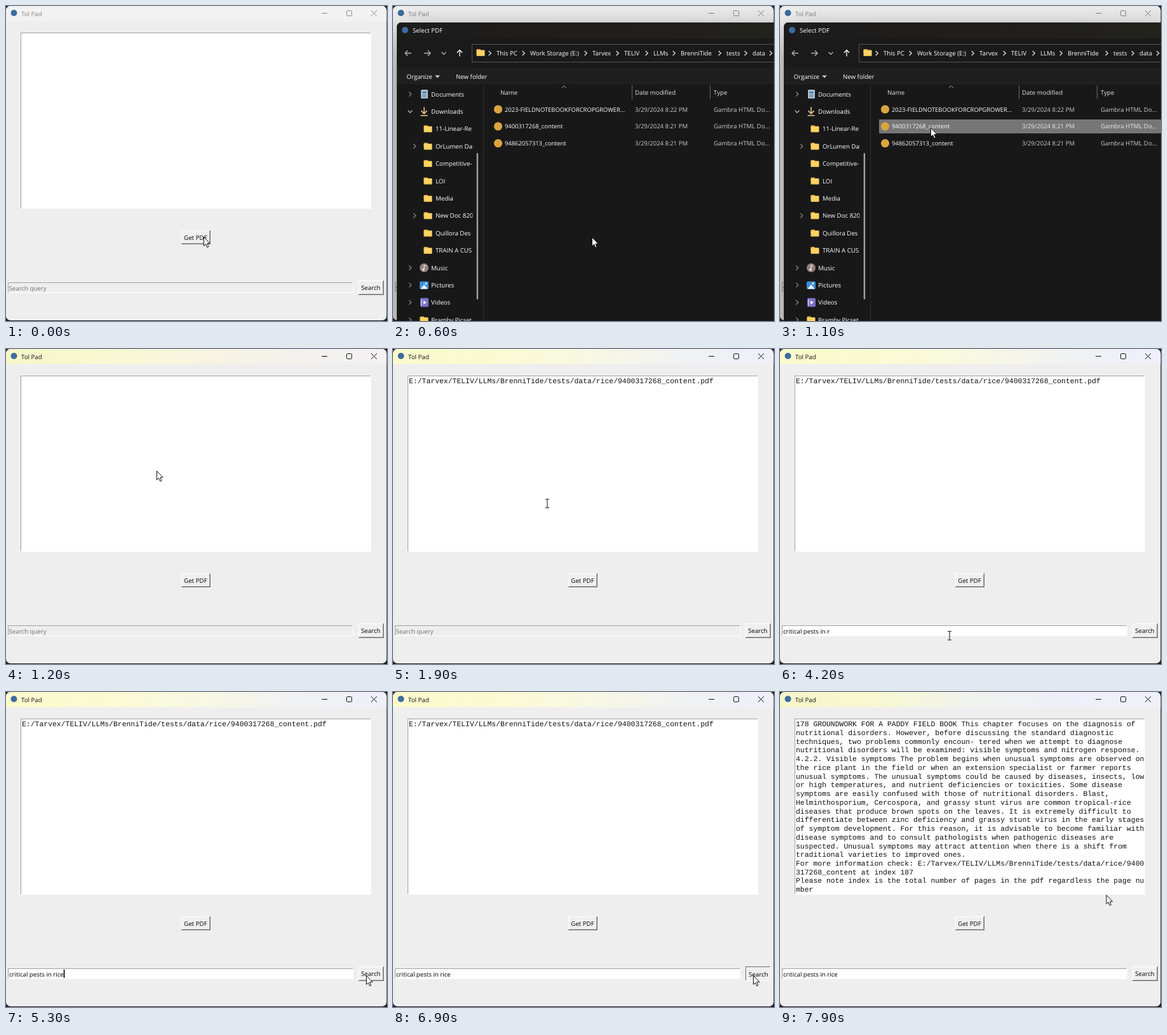
Animation of 600 by 497 pixels, one loop 8 s. Source, as an HTML page with a canvas:

```html
<!DOCTYPE html>
<html lang="en">
<head>
<meta charset="utf-8">
<title>Tol Pad</title>
<style>
html, body { margin: 0; width: 100%; height: 100%; overflow: hidden; background: #1c2023; }
canvas { display: block; }
</style>
</head>
<body>
<canvas id="stage" width="600" height="497"></canvas>
<script>
const c = document.getElementById('stage').getContext('2d');
const LOOP = 8000, STEP = 100;
const UI = '"Open Sans", "Noto Sans", sans-serif';
const MONO = '"Liberation Mono", "Courier New", monospace';
const QUERY = 'critical pests in rice';
const PATH = 'E:/Tarvex/TELIV/LLMs/BrenniTide/tests/data/rice/9400317268_content.pdf';
const RESULT = [
  '178 GROUNDWORK FOR A PADDY FIELD BOOK This chapter focuses on the diagnosis of',
  'nutritional disorders. However, before discussing the standard diagnostic',
  'techniques, two problems commonly encoun- tered when we attempt to diagnose',
  'nutritional disorders will be examined: visible symptoms and nitrogen response.',
  '4.2.2. Visible symptoms The problem begins when unusual symptoms are observed on',
  'the rice plant in the field or when an extension specialist or farmer reports',
  'unusual symptoms. The unusual symptoms could be caused by diseases, insects, low',
  'or high temperatures, and nutrient deficiencies or toxicities. Some disease',
  'symptoms are easily confused with those of nutritional disorders. Blast,',
  'Helminthosporium, Cercospora, and grassy stunt virus are common tropical-rice',
  'diseases that produce brown spots on the leaves. It is extremely difficult to',
  'differentiate between zinc deficiency and grassy stunt virus in the early stages',
  'of symptom development. For this reason, it is advisable to become familiar with',
  'disease symptoms and to consult pathologists when pathogenic diseases are',
  'suspected. Unusual symptoms may attract attention when there is a shift from',
  'traditional varieties to improved ones.',
  'For more information check: E:/Tarvex/TELIV/LLMs/BrenniTide/tests/data/rice/9400',
  '317268_content at index 187',
  'Please note index is the total number of pages in the pdf regardless the page nu',
  'mber'
];

// Event times in ms
const OPEN = 300, PICK = 1000, CLOSE = 1200, LOADED = 1500, FOCUS = 2500;
const PRESS = 5600, FREEZE = 5800, DONE = 7500;

// [time, x, y] and [time, characters]
const MOUSE = [[0, 311, 364], [300, 313, 364.5], [600, 313, 364.5], [1000, 237, 192], [1700, 237, 192],
  [2400, 267, 452], [4700, 267, 452], [5200, 567, 447], [7400, 567, 447], [7800, 513.5, 320]];
const KEYS = [[2500, 0], [2700, 2], [3000, 9], [3600, 16], [4500, 21], [4600, 22]];

function track(keys, t, ease = p => p) {
  const last = keys[keys.length - 1];
  if (t <= keys[0][0]) return keys[0].slice(1);
  if (t >= last[0]) return last.slice(1);
  const i = keys.findIndex(k => k[0] > t);
  const a = keys[i - 1], b = keys[i];
  const p = ease((t - a[0]) / (b[0] - a[0]));
  return a.slice(1).map((v, n) => v + (b[n + 1] - v) * p);
}
const smooth = p => p * p * (3 - 2 * p);

function rect(x, y, w, h, fill) {
  c.fillStyle = fill;
  c.fillRect(x, y, w, h);
}
function round(x, y, w, h, r, fill) {
  c.beginPath();
  c.roundRect(x, y, w, h, r);
  c.fillStyle = fill;
  c.fill();
}
function disc(x, y, r, fill) {
  c.beginPath();
  c.arc(x, y, r, 0, Math.PI * 2);
  c.fillStyle = fill;
  c.fill();
}
function line(color, width, ...pts) {
  c.beginPath();
  for (let i = 0; i < pts.length; i += 2) c.lineTo(pts[i], pts[i + 1]);
  c.strokeStyle = color;
  c.lineWidth = width;
  c.stroke();
}
function shape(fill, ...pts) {
  c.beginPath();
  for (let i = 0; i < pts.length; i += 2) c.lineTo(pts[i], pts[i + 1]);
  c.closePath();
  c.fillStyle = fill;
  c.fill();
}
// y is the middle of the capitals
function text(s, x, y, color, size = 9.7, align = 'left') {
  c.font = size + 'px ' + UI;
  c.textAlign = align;
  c.fillStyle = color;
  c.fillText(s, x, y + 3.5);
}
function fade(x0, x1, ...colors) {
  const g = c.createLinearGradient(x0, 0, x1, 0);
  colors.forEach((v, i) => g.addColorStop(i / (colors.length - 1), v));
  return g;
}

function button(label, x, y, w, h, down) {
  const light = '#ffffff', dark = '#6c6c6c';
  rect(x, y, w, h, down ? light : dark);
  rect(x, y, w - 1, h - 1, down ? dark : light);
  rect(x + 1, y + 1, w - 2, h - 2, down ? '#efeeef' : '#a9a9a9');
  rect(x + 1, y + 1, w - 3, h - 3, '#f0eff0');
  const d = down ? 1 : 0;
  text(label, x + w / 2 - 0.5 + d, y + h / 2 + d, '#000', 9.7, 'center');
}

function sunken(x, y, w, h, fill) {
  rect(x, y, w, h, '#fdfdfd');
  rect(x, y, w - 1, h - 1, '#a0a0a0');
  rect(x + 1, y + 1, w - 2, h - 2, fill);
}

function titleFill(t) {
  if (t < CLOSE) return '#f3f2f3';
  if (t < LOADED) return fade(0, 600, '#f6f6c8', '#f9f8d2', '#f7f5df', '#f4f1ed', '#f3f1f3');
  if (t < DONE) return fade(0, 600, '#fbfacb', '#fafad2', '#f8f8e2', '#f1f2f3', '#eeeff9');
  return fade(0, 600, '#f5f7c9', '#f7f8d0', '#f1f3ee', '#eeeff8', '#eff0f8');
}

function appWindow(t) {
  rect(0, 0, 600, 497, '#1c2023');
  c.save();
  c.beginPath();
  c.roundRect(0, 0, 599.3, 496, 7);
  c.clip();
  rect(0, 0, 600, 497, '#efeeef');
  rect(0, 0, 600, 24, titleFill(t));
  const ink = t < CLOSE ? '#858585' : '#111';
  disc(12.5, 11, 5, '#3d6d9e');
  text('Tol Pad', 24, 12, ink);
  line(ink, 1, 497, 11.5, 506, 11.5);
  c.beginPath();
  c.roundRect(536.5, 7.5, 8, 8, 1);
  c.stroke();
  line(ink, 1, 575, 7, 584, 16);
  line(ink, 1, 584, 7, 575, 16);

  sunken(23, 42, 552, 278, '#fff');
  const lines = t >= DONE ? RESULT : t >= LOADED ? [PATH] : [];
  c.font = '11.43px ' + MONO;
  c.textAlign = 'left';
  c.fillStyle = '#111';
  lines.forEach((s, i) => c.fillText(s, 25, 54.3 + i * 13.73));

  button('Get PDF', 276, 354, 46, 22, false);
  button('Search', 555, 433, 40, 23, t >= PRESS && t < DONE);
  entry(t);
  c.restore();
}

function entry(t) {
  const active = t >= FOCUS;
  sunken(3, 436, 544, 17, active ? '#fff' : '#efeeef');
  if (!active) return text('Search query', 4.5, 445, '#707070');
  const typed = QUERY.slice(0, Math.floor(track(KEYS, t)[0] + 0.01));
  text(typed, 5, 445, '#000');
  const lit = t < FREEZE && (t - FOCUS) % 900 < 600;
  if (lit) rect(5 + c.measureText(typed).width, 438, 1.6, 13, '#000');
}

function folder(x, y) {
  round(x - 6.5, y - 5.5, 6.5, 6, 1, '#dfa437');
  round(x - 6.5, y - 4, 13, 9.5, 1.2, '#f9d365');
  rect(x - 5.5, y + 4.2, 11, 0.8, '#e5b03f');
}

const icons = {
  Documents(x, y) {
    round(x - 5, y - 7, 11, 14, 1.5, '#a9bfd0');
    rect(x - 2.5, y - 4, 6, 3, '#4f7fa5');
    rect(x - 2.5, y + 1, 6, 1, '#55707f');
    rect(x - 2.5, y + 3.5, 6, 1, '#55707f');
  },
  Downloads(x, y) {
    line('#e9cf8b', 1.6, x, y - 7, x, y + 3);
    line('#e9cf8b', 1.6, x - 4.5, y - 1, x, y + 3.5, x + 4.5, y - 1);
    line('#e9cf8b', 1.6, x - 5.5, y + 6.3, x + 5.5, y + 6.3);
  },
  Music(x, y) {
    disc(x, y, 7, '#94817b');
    line('#eee', 1.2, x, y + 3, x, y - 4, x + 3, y - 3);
    disc(x - 1.2, y + 3, 1.8, '#eee');
  },
  Pictures(x, y) {
    round(x - 7, y - 6, 14, 12, 2, '#3c8fd6');
    shape('#e6f2fb', x - 6, y + 6, x, y - 1, x + 6, y + 6);
    disc(x + 3, y - 2.5, 1.4, '#fff');
  },
  Videos(x, y) {
    round(x - 6, y - 7, 13, 14, 2, '#7871c8');
    rect(x - 5, y - 5, 1.5, 10, '#c9c5f2');
    shape('#fff', x - 1, y - 3, x + 4, y, x - 1, y + 3);
  }
};

// "-" marks a child, "+" a child that can unfold
const TREE = ['Documents', 'Downloads', '-11-Linear-Re', '+OrLumen Das', '-Competitive-', '-LOI', '-Media',
  '+New Doc 820', '-Quillora Des', '-TRAIN A CUS', 'Music', 'Pictures', 'Videos', 'Bramby Picset'];
const CRUMBS = [['This PC', 163], ['Work Storage (E:)', 216], ['Tarvex', 314], ['TELIV', 364], ['LLMs', 410],
  ['BrenniTide', 453], ['tests', 525], ['data', 566]];
const FILES = [['2023-FIELDNOTEBOOKFORCROPGROWER...', '8:22'], ['9400317268_content', '8:21'], ['94862057313_content', '8:21']];

const chevron = (x, y, color) => line(color, 1.2, x - 1.8, y - 3.5, x + 1.8, y, x - 1.8, y + 3.5);
const caretDown = (x, y, color) => line(color, 1.3, x - 3.5, y - 1.8, x, y + 1.8, x + 3.5, y - 1.8);

function arrowIcon(x, y, turn, color) {
  c.save();
  c.translate(x, y);
  c.rotate(turn);
  line(color, 1.3, -5, 0, 5, 0);
  line(color, 1.3, 0.8, -4.2, 5, 0, 0.8, 4.2);
  c.restore();
}

function sidebar() {
  c.save();
  c.beginPath();
  c.rect(0, 120, 125.5, 377);
  c.clip();
  TREE.forEach((item, i) => {
    const y = 139 + i * 27.4, child = '+-'.includes(item[0]);
    const name = child ? item.slice(1) : item;
    if (item === 'Downloads') caretDown(27, y, '#bbb');
    else if (item[0] !== '-') chevron(child ? 34 : 27, y, '#8a8a8a');
    (icons[name] || folder)(child ? 55 : 49, y);
    text(name, child ? 67 : 60, y, '#fff');
  });
  c.restore();
  round(131.7, 232, 2.4, 231, 1.2, '#a3a2a3');
  rect(142, 125, 1, 372, '#302f30');
}

function fileList(t) {
  text('Name', 169, 136, '#e2e2e2');
  text('Date modified', 381, 136, '#e2e2e2');
  text('Type', 505, 136, '#e2e2e2');
  line('#aaa', 1, 266, 129, 269.5, 126, 273, 129);
  rect(376, 125, 1, 22, '#6a696a');
  rect(499, 125, 1, 22, '#6a696a');
  FILES.forEach(([name, time], i) => {
    const y = 163 + i * 26.8, on = i === 1 && t >= PICK;
    if (on) rect(156, 179, 444, 22, '#777677');
    const soft = on ? '#ececec' : '#cccbcc';
    disc(165.5, y, 6.6, '#d9a53f');
    text(name, 176, y, '#fff', 9.4);
    text('3/29/2024 ' + time + ' PM', 381, y, soft, 9.5);
    text('Gambra HTML Do...', 505, y, soft);
  });
}

function dialog(t) {
  c.save();
  c.shadowColor = 'rgba(0,0,0,0.5)';
  c.shadowBlur = 60;
  c.shadowOffsetY = 20;
  round(6, 26, 640, 520, [7, 0, 0, 0], '#191819');
  c.restore();

  c.save();
  c.beginPath();
  c.roundRect(6, 26, 640, 520, [7, 0, 0, 0]);
  c.clip();
  rect(6, 26, 600, 25, fade(6, 600, '#1d1c1d', '#1f1e1c', '#22221c'));
  rect(6, 51, 600, 47, '#1b1a1b');
  rect(6, 98, 600, 26, '#201f20');

  disc(19, 38, 5, '#3d6d9e');
  text('Select PDF', 31, 38.5, '#fff');
  arrowIcon(24, 74.5, Math.PI, '#b5b5b5');
  arrowIcon(54, 74.5, 0, '#b5b5b5');
  caretDown(80, 74.5, '#b5b5b5');
  arrowIcon(105, 74.5, -Math.PI / 2, '#fff');

  c.strokeStyle = '#555455';
  c.lineWidth = 1;
  c.strokeRect(124.5, 60.5, 490, 28);
  folder(138, 73.5);
  CRUMBS.forEach(([s, x]) => {
    chevron(x - 10.5, 74.5, '#eee');
    text(s, x, 74.5, '#fff');
  });
  chevron(595, 74.5, '#eee');

  text('Organize', 21.5, 111.5, '#fff');
  shape('#ccc', 66, 109.5, 74, 109.5, 70, 113.5);
  text('New folder', 99, 111.5, '#fff');
  sidebar();
  fileList(t);
  c.restore();
}

function pointer(t) {
  const [x, y] = track(MOUSE, t, smooth);
  const inEntry = x < 547 && y > 436 && y < 453;
  const inText = t > 1700 && x > 23 && x < 575 && y > 42 && y < 320;
  c.save();
  c.translate(x, y);
  if (t >= CLOSE && (inEntry || inText)) {
    line('#333', 1.2, 0, -6, 0, 6.5);
    line('#333', 1.2, -3, -6.5, 3, -6.5);
    line('#333', 1.2, -3, 7, 3, 7);
  } else {
    c.lineJoin = 'round';
    shape('#fff', 0.5, 0.5, 0.5, 14.5, 3.6, 11.6, 5.8, 16.8, 8, 15.8, 5.9, 10.8, 10.2, 10.6);
    c.strokeStyle = '#111';
    c.lineWidth = 1;
    c.stroke();
  }
  c.restore();
}

function draw(now) {
  const t = Math.floor((now % LOOP) / STEP) * STEP;
  c.textRendering = 'geometricPrecision';
  appWindow(t);
  if (t >= OPEN && t < CLOSE) dialog(t);
  pointer(t);
}

let start;
function tick(now) {
  if (start === undefined) start = now;
  draw(now - start);
  requestAnimationFrame(tick);
}
draw(0);
requestAnimationFrame(tick);
</script>
</body>
</html>
```
